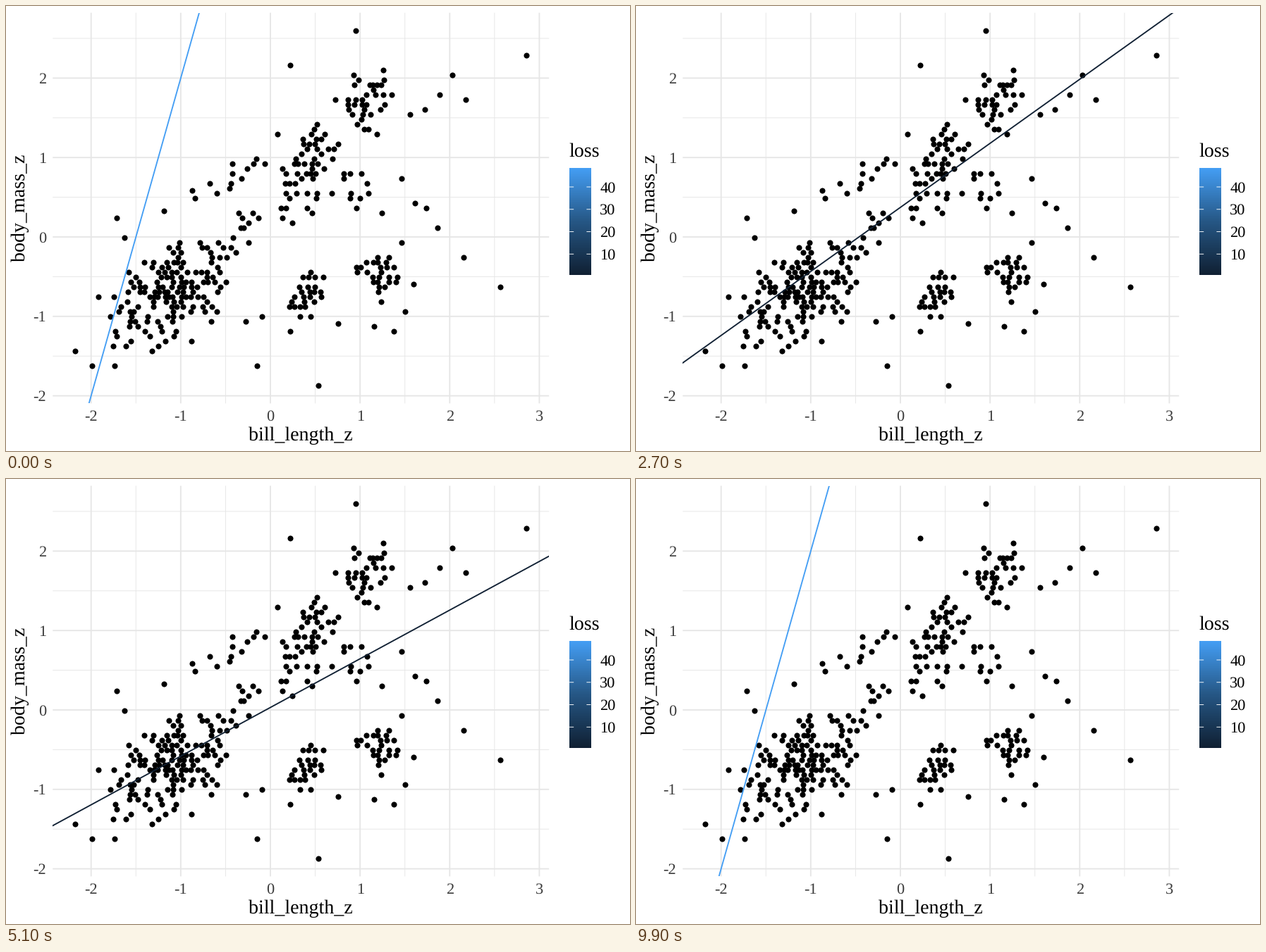
Animation of 885 by 632 pixels, one loop 10 s. Source, as a matplotlib script:

```python
import matplotlib.pyplot as plt
import numpy as np
from matplotlib.animation import FuncAnimation
from matplotlib.colors import LinearSegmentedColormap
from matplotlib.patches import Rectangle

WIDTH, HEIGHT, DPI = 885, 632, 64
PT = 72 / DPI  # points per pixel
LEFT, TOP, RIGHT, BOTTOM = 66.3, 9.6, 770.2, 564.4
FRAMES, INTERVAL = 100, 100

GRID, TICK_TEXT = "#E6E6E6", "#3C3C3C"
TITLE_SIZE, TICK_SIZE = 28, 22.4
THICK, THIN = 1.87, 0.93
loss_map = LinearSegmentedColormap.from_list(
    "loss", ["#102033", "#265785", "#449EF4"])

# Gradient descent on standardised data, started at y = 6 + 4x
START_SLOPE, START_INTERCEPT, CORRELATION = 4, 6, 0.595
SHRINK = 0.9 ** 0.977
MIN_LOSS = 1 - CORRELATION ** 2
LOSS_SPAN = START_INTERCEPT ** 2 + (START_SLOPE - CORRELATION) ** 2

# Isolated observations, in stage pixels
OUTLIERS = [
    (496, 35), (738, 70), (403, 84), (633, 98), (615, 126), (652, 133),
    (594, 147), (573, 154), (385, 182), (561, 245), (580, 280), (596, 287),
    (533, 294), (612, 315), (561, 336), (649, 357), (701, 399), (578, 395),
    (566, 434), (522, 455), (550, 462), (443, 539), (403, 462), (471, 451),
    (98, 490), (122, 511), (131, 413), (157, 301), (168, 329), (154, 511),
    (224, 291), (264, 262), (356, 511), (363, 441), (340, 448),
]

# count, centre x, centre y, spread x, spread y, correlation
CLUSTERS = [
    (141, 238, 407, 49, 48, -0.50),
    (10, 345, 318, 15, 24, -0.30),
    (12, 322, 250, 30, 18, -0.65),
    (49, 428, 237, 23, 40, -0.45),
    (34, 509, 135, 25, 28, -0.10),
    (12, 492, 252, 18, 33, 0.00),
    (25, 427, 411, 15, 20, -0.40),
    (26, 529, 382, 18, 22, 0.00),
]
ROW_ORIGIN, ROW_STEP = 328.5, 7  # masses were rounded to 50 g


def px(x):
    return 375 + 127.15 * x


def py(y):
    return 328 - 112.8 * y


def scatter_points():
    rng = np.random.default_rng(7)
    points = list(OUTLIERS)
    for count, cx, cy, sx, sy, corr in CLUSTERS:
        placed = 0
        while placed < count:
            u, v = rng.normal(size=2)
            if np.hypot(u, v) > 1.95:
                continue
            x = cx + sx * u
            y = cy + sy * (corr * u + np.sqrt(1 - corr ** 2) * v)
            y = ROW_ORIGIN + ROW_STEP * round((y - ROW_ORIGIN) / ROW_STEP)
            if all(np.hypot(x - a, y - b) > 4.5 for a, b in points):
                points.append((x, y))
                placed += 1
    return np.array(points)


def segment(xs, ys, color, width, z):
    return ax.plot(xs, ys, color=color, lw=width * PT, zorder=z,
                   solid_capstyle="butt", snap=False)[0]


def label(x, y, text, size, color="black", ha="center", rotation=0):
    ax.text(x, y, text, fontsize=size * PT, color=color, ha=ha,
            va="baseline", rotation=rotation, rotation_mode="anchor")


def draw_grid():
    for half in range(-4, 7):
        x, major = px(half / 2), half % 2 == 0
        segment([x, x], [TOP, BOTTOM], GRID, THICK if major else THIN, 1)
        if major:
            label(x, 588.7, str(half // 2), TICK_SIZE, TICK_TEXT)
    for half in range(-4, 6):
        y, major = py(half / 2), half % 2 == 0
        segment([LEFT, RIGHT], [y, y], GRID, THICK if major else THIN, 1)
        if major:
            label(57.3, y + 7.4, str(half // 2), TICK_SIZE, TICK_TEXT,
                  ha="right")
    label((LEFT + RIGHT) / 2, 617, "bill_length_z", TITLE_SIZE)
    label(27.3, (TOP + BOTTOM) / 2, "body_mass_z", TITLE_SIZE, rotation=90)


def draw_legend():
    x0, x1, y0, y1 = 799.2, 829.4, 230.8, 382
    ax.imshow(np.linspace(1, 0, 300)[:, None], cmap=loss_map, aspect="auto",
              extent=(x0, x1, y1, y0), interpolation="bilinear", zorder=2)
    label(798.8, 214, "loss", TITLE_SIZE, ha="left")
    for value in range(10, 50, 10):
        y = y1 - (y1 - y0) * (value - MIN_LOSS) / LOSS_SPAN
        segment([x0, x0 + 6], [y, y], "white", THIN, 3)
        segment([x1 - 6, x1], [y, y], "white", THIN, 3)
        label(842.3, y + 7.4, str(value), TICK_SIZE, ha="left")


plt.rcParams["font.family"] = "Liberation Serif"
plt.rcParams["text.hinting"] = "no_hinting"
fig = plt.figure(figsize=(WIDTH / DPI, HEIGHT / DPI), dpi=DPI,
                 facecolor="white")
ax = fig.add_axes([0, 0, 1, 1])
ax.axis("off")

draw_grid()
draw_legend()
dots = scatter_points()
ax.scatter(dots[:, 0], dots[:, 1], s=(8.1 * PT) ** 2, c="black", lw=0,
           zorder=4)
ax.set_xlim(0, WIDTH)
ax.set_ylim(HEIGHT, 0)

panel = Rectangle((LEFT, TOP), RIGHT - LEFT, BOTTOM - TOP,
                  transform=ax.transData)
fit_line = segment([], [], "black", THICK, 5)
fit_line.set_clip_path(panel)
ends = np.array([-2.6, 3.3])


def update(frame):
    # The last frame wraps back to the starting guess
    error = SHRINK ** (frame % (FRAMES - 1))
    slope = CORRELATION + (START_SLOPE - CORRELATION) * error
    fit_line.set_data(px(ends), py(START_INTERCEPT * error + slope * ends))
    fit_line.set_color(loss_map(error ** 2))
    return [fit_line]


anim = FuncAnimation(fig, update, frames=FRAMES, interval=INTERVAL,
                     repeat=True, repeat_delay=0, blit=False)
plt.show()
```
